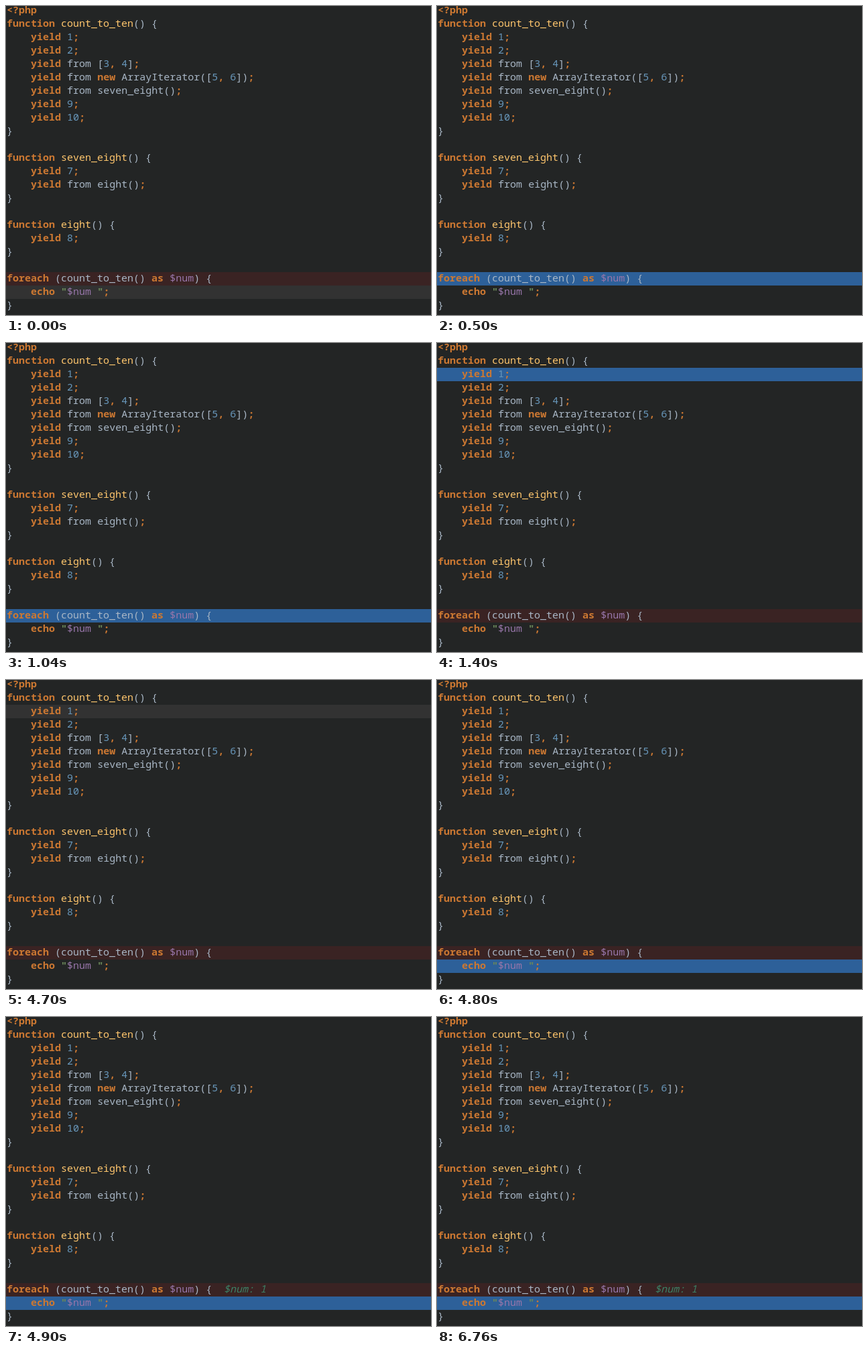
Write an HTML page that moves like this. It is 634 px wide and 461 px high and loops after 8 s.

```html
<!DOCTYPE html>
<html lang="en">
<head>
<meta charset="utf-8">
<title>Generator stepping</title>
<style>
  html, body { margin: 0; width: 100%; height: 100%; overflow: hidden; background: #232525; }
  svg { display: block; }
  text { font: 500 15px "Noto Sans Mono", monospace; white-space: pre; fill: #a9b7c6; }
  .keyword { fill: #cc7832; font-weight: bold; }
  .mark { fill: #cc7832; font-weight: 600; }
  .name { fill: #ffc66d; }
  .number { fill: #6897bb; }
  .variable { fill: #9876aa; }
  .string { fill: #6a8759; font-weight: 600; }
  #hint { fill: #3d8065; font-style: italic; }
</style>
</head>
<body>
<svg id="stage" width="634" height="461">
  <rect id="breakpoint" width="634" height="20" fill="#3a2323"/>
  <rect id="current" width="634" height="20"/>
  <g id="code"></g>
  <text id="hint">$num: 1</text>
</svg>
<script>
const source = `<?php
function count_to_ten() {
    yield 1;
    yield 2;
    yield from [3, 4];
    yield from new ArrayIterator([5, 6]);
    yield from seven_eight();
    yield 9;
    yield 10;
}

function seven_eight() {
    yield 7;
    yield from eight();
}

function eight() {
    yield 8;
}

foreach (count_to_ten() as $num) {
    echo "$num ";
}`;

const DURATION = 8000;
const ROW = 20, COLUMN = 9;
const CARET = '#323232', STEP = '#2d6099';
const YIELD_ROW = 2, LOOP_ROW = 20, ECHO_ROW = 21;

// Each state: start time, highlighted row, its colour
const states = [
  [0, ECHO_ROW, CARET],
  [500, LOOP_ROW, STEP],
  [1400, YIELD_ROW, STEP],
  [4700, YIELD_ROW, CARET],
  [4800, ECHO_ROW, STEP],
];
const HINT_START = 4900;

const token = /(?<keyword><\?php|\b(?:function|yield|new|foreach|as|echo)\b)|(?<name>(?<=function )\w+)|(?<variable>\$\w+)|(?<number>\b\d+)|(?<mark>[;,])|(?<string>")|(?<plain>\w+|[^\w])/g;

const find = id => document.getElementById(id);
const rowTop = row => row * ROW - 3;

function svg(tag, attributes, parent) {
  const node = document.createElementNS('http://www.w3.org/2000/svg', tag);
  for (const key in attributes) node.setAttribute(key, attributes[key]);
  return parent.appendChild(node);
}

function place(node, column, row) {
  node.setAttribute('x', 1 + column * COLUMN);
  node.setAttribute('y', rowTop(row) + 14);
}

source.split('\n').forEach((line, row) => {
  const text = svg('text', {}, find('code'));
  place(text, 0, row);
  for (const { 0: word, groups } of line.matchAll(token)) {
    const kind = Object.keys(groups).find(key => groups[key]);
    svg('tspan', { class: kind }, text).textContent = word;
  }
});
place(find('hint'), 36, LOOP_ROW);
find('breakpoint').setAttribute('y', rowTop(LOOP_ROW));

function draw() {
  const time = performance.now() % DURATION;
  const [, row, color] = states.findLast(([start]) => time >= start);
  find('current').setAttribute('y', rowTop(row));
  find('current').setAttribute('fill', color);
  find('hint').setAttribute('visibility', time >= HINT_START ? 'visible' : 'hidden');
  requestAnimationFrame(draw);
}
draw();
</script>
</body>
</html>
```
